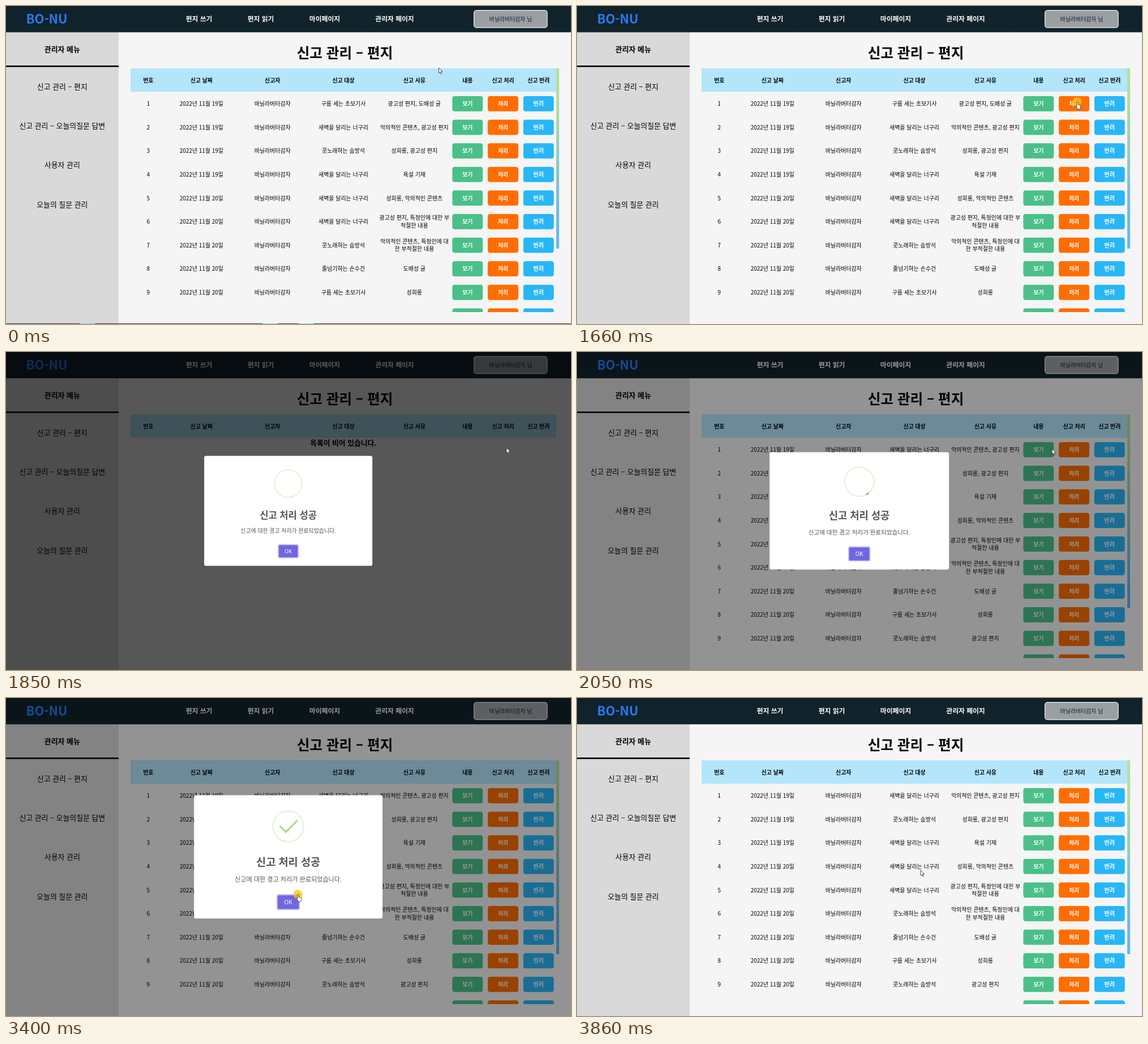
An HTML page for the animation above (6.13 s loop, 998 by 561 pixels).

```html
<!DOCTYPE html>
<html lang="ko">
<head>
<meta charset="utf-8">
<style>
  html, body { margin: 0; width: 100%; height: 100%; overflow: hidden; background: #f5f5f5; }
  svg { display: block; width: 100%; height: 100%; }
  text { font-family: "Noto Sans CJK KR", "Noto Sans CJK", "Noto Sans CJK JP", sans-serif; text-anchor: middle; }
</style>
</head>
<body>
<svg id="stage" viewBox="0 0 998 561" preserveAspectRatio="none"></svg>
<script>
const LOOP = 6130, FRAME = 1000 / 15;
const CLICK_REPORT = 1650, LOAD_START = 1785, SHOW = 1816, LOAD_END = 1985, CLICK_OK = 3385, HIDE = 3489;
const COLUMNS = [251.3, 345.3, 470.7, 596, 721.3, 815.3, 878, 940.7];
const ROW_HEIGHT = 41.6;

const USER = '바닐라버터감자';
const [CLOUD, DAWN, HUM, ROPE] = ['구름 세는 초보기사', '새벽을 달리는 너구리', '콧노래하는 솜방석', '줄넘기하는 손수건'];
const REPORTS = [
  [19, CLOUD, '광고성 편지, 도배성 글'],
  [19, DAWN, '악의적인 콘텐츠, 광고성 편지'],
  [19, HUM, '성희롱, 광고성 편지'],
  [19, DAWN, '욕설 기재'],
  [20, DAWN, '성희롱, 악의적인 콘텐츠'],
  [20, DAWN, '광고성 편지, 특정인에 대한 부\n적절한 내용'],
  [20, HUM, '악의적인 콘텐츠, 특정인에 대\n한 부적절한 내용'],
  [20, ROPE, '도배성 글'],
  [20, CLOUD, '성희롱'],
  [20, HUM, '광고성 편지'],
  [20, HUM, '광고성 편지'],
];

// Text centred on (x, y)
const label = (x, y, size, text, fill = '#000', weight = 400) =>
  `<text x="${x}" y="${y + size * 0.375}" font-size="${size}" fill="${fill}" font-weight="${weight}">${text}</text>`;
const rect = (x, y, w, h, fill, extra = '') =>
  `<rect x="${x}" y="${y}" width="${w}" height="${h}" fill="${fill}" ${extra}/>`;

const button = (x, y, text, fill) =>
  rect(x - 27.4, y - 13.9, 54.8, 27.8, fill, 'rx="4.4" stroke="#fff" stroke-width=".8"') +
  label(x, y, 9.9, text, '#fff', 700);

function row([day, target, reason], i) {
  const y = 130.8 + ROW_HEIGHT * (i + 1);
  const lines = reason.split('\n');
  const cells = [i + 1, `2022년 11월 ${day}일`, USER, target];
  return cells.map((text, c) => label(COLUMNS[c], y, 9.95, text, '#000', c > 1 ? 500 : 400)).join('') +
    lines.map((text, n) => label(COLUMNS[4], y + (n - (lines.length - 1) / 2) * 13.3, 9.95, text, '#000', 500)).join('') +
    button(COLUMNS[5], y, '보기', '#4ac088') +
    button(COLUMNS[6], y, '처리', '#ff6d00') +
    button(COLUMNS[7], y, '반려', '#29b6f6');
}

const list = (id, reports, barHeight) => `<g id="${id}">
  <g clip-path="url(#viewport)">${reports.map(row).join('')}</g>
  ${rect(972, 110, 5, barHeight, 'url(#bar)')}</g>`;

const menu = [[142, '신고 관리 – 편지'], [211, '신고 관리 – 오늘의질문 답변'], [280.5, '사용자 관리'], [350, '오늘의 질문 관리']];
const nav = [[341, '편지 쓰기'], [450, '편지 읽기'], [563, '마이페이지'], [686.5, '관리자 페이지']];
const heads = ['번호', '신고 날짜', '신고자', '신고 대상', '신고 사유', '내용', '신고 처리', '신고 반려'];

const stage = document.getElementById('stage');
stage.innerHTML = `
  <defs>
    <linearGradient id="bar" x2="0" y2="1">
      <stop stop-color="#b5e29b"/><stop offset=".2" stop-color="#b0dd9c"/><stop offset=".75" stop-color="#72bbe4"/><stop offset="1" stop-color="#64b5f6"/>
    </linearGradient>
    <linearGradient id="top" x2="0" y2="1"><stop stop-color="#10212a"/><stop offset="1" stop-color="#11242c"/></linearGradient>
    <clipPath id="viewport">${rect(220, 151, 752, 389, '#000')}</clipPath>
  </defs>
  ${rect(0, 0, 998, 561, '#f5f5f5')}
  ${rect(0, 46, 199, 515, '#d9d9d9')}
  ${rect(0, 0, 998, 46.4, 'url(#top)')}
  ${label(72, 23, 22, 'BO-NU', '#2979f2', 900)}
  ${nav.map(([x, text]) => label(x, 23, 11.8, text, '#fff', 600)).join('')}
  ${rect(826.6, 7.6, 129.4, 30.6, '#9a9fa2', 'rx="4.5" stroke="#eee" stroke-width="1.3"')}
  ${label(891.3, 23, 9.9, USER + ' 님', '#10202a', 500)}
  ${label(99.3, 76, 12.9, '관리자 메뉴', '#000', 700)}
  ${rect(0, 105, 199, 2.6, '#000')}
  ${menu.map(([y, text]) => label(99.3, y, 12.9, text)).join('')}
  ${label(598.5, 83, 24.6, '신고 관리 – 편지', '#000', 700)}
  ${rect(220, 110, 752, 41.3, '#b3e5fc')}
  ${heads.map((text, i) => label(COLUMNS[i], 130.8, 9.9, text, '#000', 700)).join('')}
  ${list('before', REPORTS.slice(0, 10), 318)}
  ${list('after', REPORTS.slice(1), 342)}
  <g id="empty">${label(595.8, 160, 12.8, '목록이 비어 있습니다.', '#000', 700)}</g>
  <g id="taskbar">${rect(0, 560, 998, 1, '#333')}${[130, 453, 517].map(x => rect(x, 560, 27, 1, '#8cc8ee')).join('')}</g>
  ${rect(0, 0, 998, 561, '#000', 'id="loading" opacity=".5"')}
  ${rect(0, 0, 998, 561, '#000', 'id="backdrop"')}
  <g id="dialog">
    ${rect(-166.5, -108.7, 333, 217.4, '#fff', 'rx="3.3"')}
    <g transform="translate(0 -54)" fill="none" stroke="#a5dc86" stroke-width="3.25" stroke-linecap="round">
      <circle r="27.2" stroke-width="2.6" stroke-opacity=".3"/>
      <path id="notch" d="M13.5 23.6l3-2" stroke="#909a8c" stroke-width="2.4"/>
      <path id="tip"/><path id="long"/>
    </g>
    ${label(0, 8.5, 18.6, '신고 처리 성공', '#545454', 600)}
    ${label(0, 39.7, 11.1, '신고에 대한 경고 처리가 완료되었습니다.', '#545454')}
    ${rect(-19.5, 67, 39, 25.6, '#7066e0', 'rx="2.6" stroke="#b8b3f0" stroke-width="2"')}
    ${label(0, 79.8, 10.5, 'OK', '#fff', 500)}
  </g>
  <circle id="click" r="8" fill="#ffc400" fill-opacity=".75"/>
  <g id="cursor" fill="#fff" stroke="#222" stroke-width=".8" stroke-linejoin="round">
    <path id="arrow" d="M0 0V9.3L2.2 7.3L3.7 10.7L5.2 10L3.8 6.7H6.6Z"/>
    <path id="hand" d="M-1.2 1a1.2 1.2 0 0 1 2.4 0V5l3.6.9q1.2.4 1 1.8l-.6 3.6q-.3 1.7-1.8 1.7H.6L-2.9 8.6q-.7-1.6.8-1.3l.9.9Z"/>
  </g>`;

const el = Object.fromEntries([...stage.querySelectorAll('[id]')].map(node => [node.id, node]));
const show = (node, on) => node.setAttribute('visibility', on ? 'visible' : 'hidden');
const clamp = p => Math.min(1, Math.max(0, p));

// The CSS "ease" curve
function ease(x) {
  let low = 0, high = 1, u;
  for (let i = 0; i < 20; i++) {
    u = (low + high) / 2;
    if (0.75 * u * (1 - u) + u ** 3 < x) low = u; else high = u;
  }
  return 0.3 * u * (1 - u) ** 2 + 3 * u * u * (1 - u) + u ** 3;
}

// Interpolates stops of the form [position, ...values]
function keyed(at, stops, curve = p => p) {
  const i = stops.findIndex(stop => stop[0] > at);
  if (i < 0) return stops.at(-1).slice(1);
  const a = stops[Math.max(0, i - 1)], b = stops[i];
  const p = curve(clamp((at - a[0]) / (b[0] - a[0] || 1)));
  return a.slice(1).map((v, n) => v + (b[n + 1] - v) * p);
}

const POINTER = [
  [0, 764.5, 109], [59, 764.5, 109], [660, 884, 157], [730, 884, 158], [1130, 884, 169], [1870, 884, 169],
  [2059, 839, 171], [2250, 824, 174], [2330, 800, 186], [2659, 612, 301], [2910, 516, 346], [3385, 516, 346],
  [3525, 521, 351], [3590, 527, 349], [3855, 607, 304],
];
const POP = [[0, 0.7], [0.45, 1.05], [0.8, 0.95], [1, 1]];
// Check strokes: position, left, top, length in em
const TIP = [[0, 0.0625, 1.1875, 0], [0.54, 0.125, 1.0625, 0], [0.7, -0.375, 2.1875, 3.125], [0.84, 1.3125, 3, 1.0625], [1, 0.8125, 2.8125, 1.5625]];
const LONG = [[0, 2.125, 3.375, 0], [0.65, 2.125, 3.375, 0], [0.84, 1.5625, 2.1875, 3.4375], [1, 1.5625, 2.375, 2.9375]];

function drawStroke(node, stops, p, slope) {
  const em = 10.4, [left, top, length] = keyed(p, stops, ease);
  const x = (left + length / 2 - 2.5) * em, y = (top - 2.344) * em;
  const half = (length - 0.3125) / 2 * em * Math.SQRT1_2;
  node.setAttribute('d', half > 0 ? `M${x - half} ${y - half * slope}L${x + half} ${y + half * slope}` : '');
}

function render(now) {
  const t = Math.max(0, Math.floor((now % LOOP - 49) / FRAME) * FRAME + 59);

  show(el.taskbar, t < 50);
  show(el.before, t < LOAD_START);
  show(el.after, t >= LOAD_END);
  show(el.empty, t >= LOAD_START && t < LOAD_END);
  show(el.loading, t >= LOAD_START && t < LOAD_END);

  const fadeIn = ease(clamp((t - SHOW) / 100)), fadeOut = ease(clamp((t - HIDE) / 100));
  el.backdrop.setAttribute('opacity', t < SHOW ? 0 : 0.4 * fadeIn * (1 - fadeOut));

  const leaving = t > HIDE ? ease(clamp((t - HIDE) / 150)) : 0;
  const scale = keyed((t - SHOW) / 300, POP, ease)[0] * (1 - leaving / 2);
  show(el.dialog, t >= SHOW && t < HIDE + 150);
  el.dialog.setAttribute('transform', `translate(498.6 280.3) scale(${scale})`);
  el.dialog.setAttribute('opacity', 1 - leaving);
  el.notch.setAttribute('opacity', t > 1985 && t < 2100 ? 1 : 0);
  drawStroke(el.tip, TIP, (t - SHOW) / 750, 1);
  drawStroke(el.long, LONG, (t - SHOW) / 750, -1);

  const [x, y] = keyed(t, POINTER);
  const onButton = (t > 600 && t < LOAD_START) || (t > 2880 && t < HIDE);
  el.cursor.setAttribute('transform', `translate(${x} ${y})`);
  show(el.hand, onButton);
  show(el.arrow, !onButton);
  el.click.setAttribute('transform', `translate(${x - 0.7} ${y})`);
  show(el.click, [CLICK_REPORT, CLICK_OK].some(start => t >= start && t < start + 110));
}

const start = performance.now();
(function tick() {
  render(performance.now() - start);
  requestAnimationFrame(tick);
})();
</script>
</body>
</html>
```
